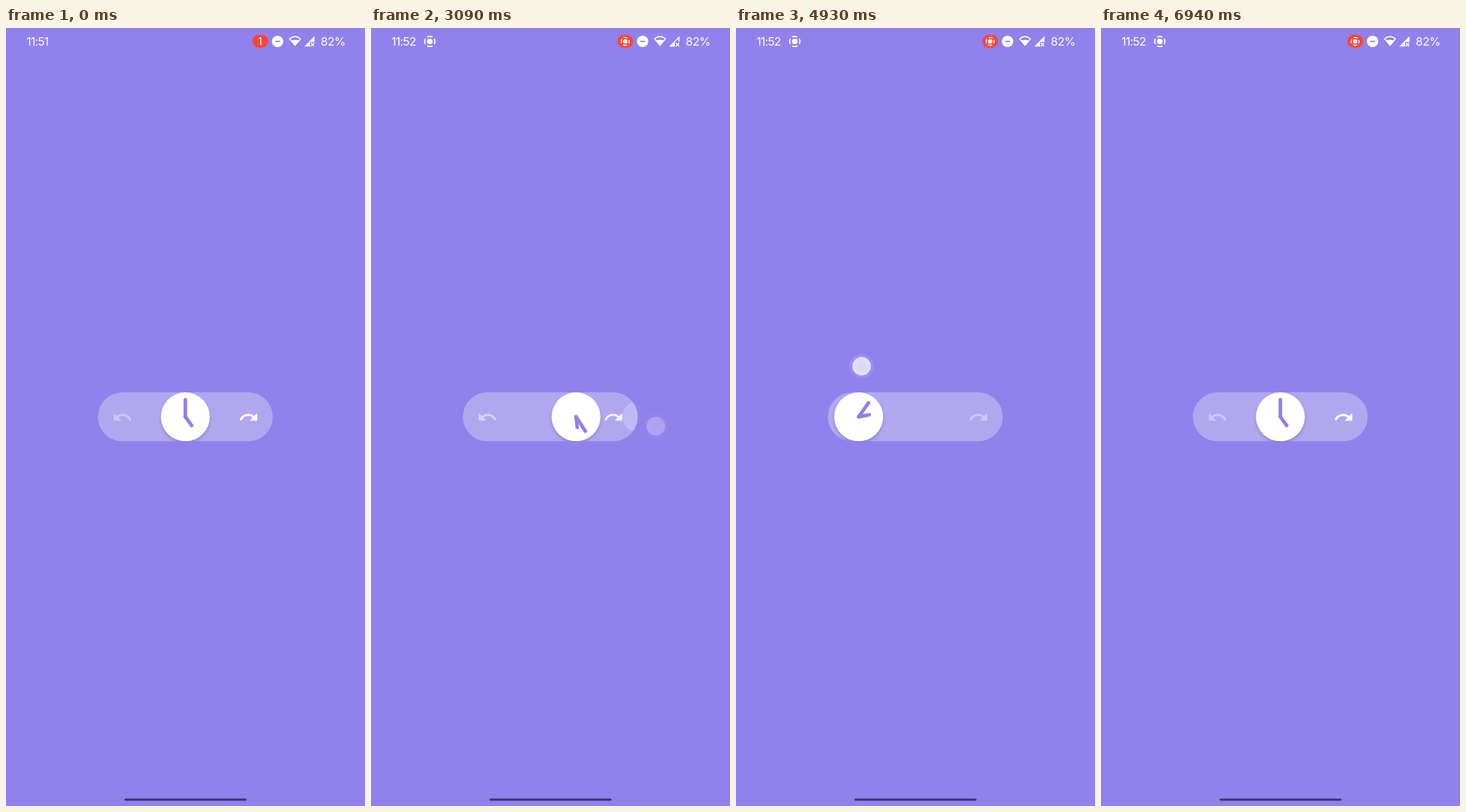
Animation, 508 px wide and 1102 px high, one loop 7.07 s. Source, as an HTML page:

```html
<!DOCTYPE html>
<html lang="en">
<head>
<meta charset="utf-8">
<title>Time slider</title>
<style>
html, body { margin: 0; width: 100%; height: 100%; overflow: hidden; background: #9181ec; }
svg { display: block; width: 100vw; height: 100vh; }
text { font-family: Inter, Roboto, sans-serif; font-size: 16.5px; fill: #fff; }
</style>
</head>
<body>
<svg viewBox="0 0 508 1102" xmlns="http://www.w3.org/2000/svg">
  <defs>
    <clipPath id="pillClip"><rect x="130" y="516" width="247.5" height="69.5" rx="34.75"/></clipPath>
    <filter id="soft" x="-30%" y="-30%" width="160%" height="160%"><feGaussianBlur stdDeviation="2.6"/></filter>
    <radialGradient id="core">
      <stop offset="0" stop-color="#fff" stop-opacity=".58"/>
      <stop offset="1" stop-color="#fff" stop-opacity=".72"/>
    </radialGradient>
    <radialGradient id="halo">
      <stop offset=".7" stop-color="#fff" stop-opacity=".17"/>
      <stop offset=".9" stop-color="#fff" stop-opacity=".1"/>
      <stop offset="1" stop-color="#fff" stop-opacity="0"/>
    </radialGradient>
    <path id="arrow" d="M12.5 8c-2.65 0-5.05.99-6.9 2.6L3.1 8.1C2.6 7.6 2 7.8 2 8.5V15q0 1 1 1h6.5c.7 0 .9-.7.4-1.1L7.38 12.38c1.39-1.16 3.16-1.88 5.12-1.88 3.1 0 5.8 1.8 7.1 4.4.9 1.8 3.1.7 2.4-1C20.2 10.3 16.7 8 12.5 8z"/>
    <g id="rec" fill="none" stroke="#fff">
      <circle r="4" fill="#fff" stroke="none"/>
      <circle r="7.2" stroke-width="1.8" pathLength="80" stroke-dasharray="14 6" stroke-dashoffset="7"/>
    </g>
  </defs>

  <rect width="508" height="1102" fill="#9181ec"/>

  <text id="clock" x="29" y="25.3" letter-spacing="-.75">11:51</text>
  <use id="cast" href="#rec"/>
  <rect x="348.5" y="9.5" width="22.5" height="18.5" rx="9.2" fill="#f4483c"/>
  <text id="count" x="359.5" y="24" text-anchor="middle" style="font-size:14px">1</text>
  <use id="pillRec" href="#rec" transform="translate(359.7 19) scale(.78)"/>
  <circle cx="384.3" cy="19" r="8.1" fill="#fff"/>
  <path d="M381 19h6.8" stroke="#9181ec" stroke-width="1.8"/>
  <path d="M401.3 15.3q7.7-6.3 15.4 0L409 24.6z" fill="none" stroke="#fff" stroke-width="1.6" stroke-linejoin="round"/>
  <path d="M403.6 17.8q5.4-2.2 10.8 0L409 24.8z" fill="#fff"/>
  <path id="barsFull" d="M422 26.3L436.5 11.5V19.8H430.3V26.3z" fill="#fff"/>
  <g id="barsHalf" fill="none" stroke="#fff" stroke-width="1.4">
    <path d="M430 25.6H423.6L435.8 13.2V19.5"/>
    <path d="M422.3 26.3L430 18.5V26.3z" fill="#fff" stroke="none"/>
  </g>
  <path d="M431.6 21.3l4.4 4.6M436 21.3l-4.4 4.6" stroke="#fff" stroke-width="1.5"/>
  <text x="445.3" y="25.3" letter-spacing="-.5">82%</text>

  <g clip-path="url(#pillClip)">
    <rect x="130" y="516" width="247.5" height="69.5" fill="#b1a7ef"/>
    <circle id="ripple" cx="378" cy="550.5" fill="#fff"/>
    <use id="undo" href="#arrow" fill="#fff" transform="translate(150 536.6) scale(1.23)"/>
    <use id="redo" href="#arrow" fill="#fff" transform="translate(358 536.6) scale(-1.23 1.23)"/>
    <g id="knob">
      <circle cy="3" r="33.8" fill="#2d2266" opacity=".32" filter="url(#soft)"/>
      <circle r="34.6" fill="#fff"/>
      <g stroke="#9080ea" stroke-width="5" stroke-linecap="round">
        <path id="hour" d="M0 0V-15.2"/>
        <path id="minute" d="M0 0V-24.3"/>
      </g>
    </g>
  </g>

  <g id="touch">
    <circle r="18" fill="url(#halo)"/>
    <circle r="13.2" fill="url(#core)"/>
    <circle r="13.9" fill="none" stroke="#8c84dc" stroke-opacity=".3" stroke-width="1.8"/>
  </g>

  <rect x="167.5" y="1091.5" width="173" height="3" rx="1.5" fill="#3b3268"/>
</svg>
<script>
const LOOP = 7070, MID = 253.8, REACH = 88.9;
const $ = id => document.getElementById(id);
const clamp = (v, a = 0, b = 1) => Math.min(b, Math.max(a, v));
const ramp = (t, a, b) => clamp((t - a) / (b - a));
const mix = (a, b, k) => a + (b - a) * k;
const show = (id, o) => $(id).setAttribute("opacity", o);
const move = (id, x, y, extra = "") => $(id).setAttribute("transform", `translate(${x} ${y}) ${extra}`);

// Each drag: finger path as [time, x, y], release time, grab point and direction
const drags = [
  { side: 1, grab: 249.3, release: 2972, path: [
    [1180, 249, 554], [1310, 249, 554], [1460, 273, 559], [1720, 322, 587],
    [2010, 356, 627], [2170, 356, 627], [2500, 372, 605], [2890, 403, 564]] },
  { side: -1, grab: 258, release: 5902, path: [
    [4390, 260.5, 542], [4505, 260, 542], [4590, 235, 521], [4850, 186, 485],
    [5230, 157, 465], [5600, 145, 463], [5740, 145, 463]] }
];

// Monotone cubic through the points of a path
function along(path, t, c) {
  const n = path.length - 1;
  if (t <= path[0][0]) return path[0][c];
  if (t >= path[n][0]) return path[n][c];
  const i = path.findIndex(p => p[0] > t) - 1;
  const slope = j => (path[j + 1][c] - path[j][c]) / (path[j + 1][0] - path[j][0]);
  const tangent = j => {
    if (j === 0 || j === n) return 0;
    const a = slope(j - 1), b = slope(j);
    return a * b > 0 ? 2 * a * b / (a + b) : 0;
  };
  const h = path[i + 1][0] - path[i][0], u = (t - path[i][0]) / h, v = 1 - u;
  return v * v * (1 + 2 * u) * path[i][c] + u * u * (3 - 2 * u) * path[i + 1][c]
    + h * u * v * (v * tangent(i) - u * tangent(i + 1));
}

function spring(s) {
  const z = 0.485, w = 12.2, q = Math.sqrt(1 - z * z), a = w * q * s;
  return Math.exp(-z * w * s) * (Math.cos(a) + z / q * Math.sin(a));
}

function knobTurn(t) {
  const d = drags.findLast(g => t >= g.path[0][0]);
  if (!d) return 0;
  if (t < d.release) return d.side * clamp(d.side * (along(d.path, t, 1) - d.grab) / REACH);
  const s = (t - d.release) / 1000;
  return s > 1.02 ? 0 : d.side * spring(s);
}

function drawTouch(t) {
  const d = drags.find(g => t >= g.path[0][0] && t < g.release + 230);
  show("touch", d ? 1 - ramp(t, d.release - 20, d.release + 200) : 0);
  if (d) move("touch", along(d.path, t, 1), along(d.path, t, 2));
}

function drawStatus(t) {
  const late = t >= 1700, half = late && t < 3840, swap = ramp(t, 30, 130), pop = ramp(t, 150, 480);
  $("clock").textContent = late ? "11:52" : "11:51";
  move("cast", late ? 83.2 : 81, 19, `scale(${mix(0.5, 1, pop)})`);
  show("cast", pop);
  show("count", 1 - swap);
  show("pillRec", swap);
  show("barsFull", half ? 0 : 1);
  show("barsHalf", half ? 1 : 0);
}

function render(t) {
  const p = knobTurn(t);
  move("knob", MID + p * REACH, 550.7);
  $("minute").setAttribute("transform", `rotate(${360 * p})`);
  $("hour").setAttribute("transform", `rotate(${144 + 72 * p})`);

  const back = ramp(t, 2980, 3480) - ramp(t, 5910, 6410);
  show("undo", mix(0.36, 1, back));
  show("redo", mix(1, 0.36, back));

  const r = ramp(t, 2980, 3280);
  $("ripple").setAttribute("r", mix(14, 36, r));
  show("ripple", r > 0 ? 0.32 * (1 - r) : 0);

  drawTouch(t);
  drawStatus(t);
}

const start = performance.now();
function tick() {
  render((performance.now() - start) % LOOP);
  requestAnimationFrame(tick);
}
render(0);
requestAnimationFrame(tick);
</script>
</body>
</html>
```
